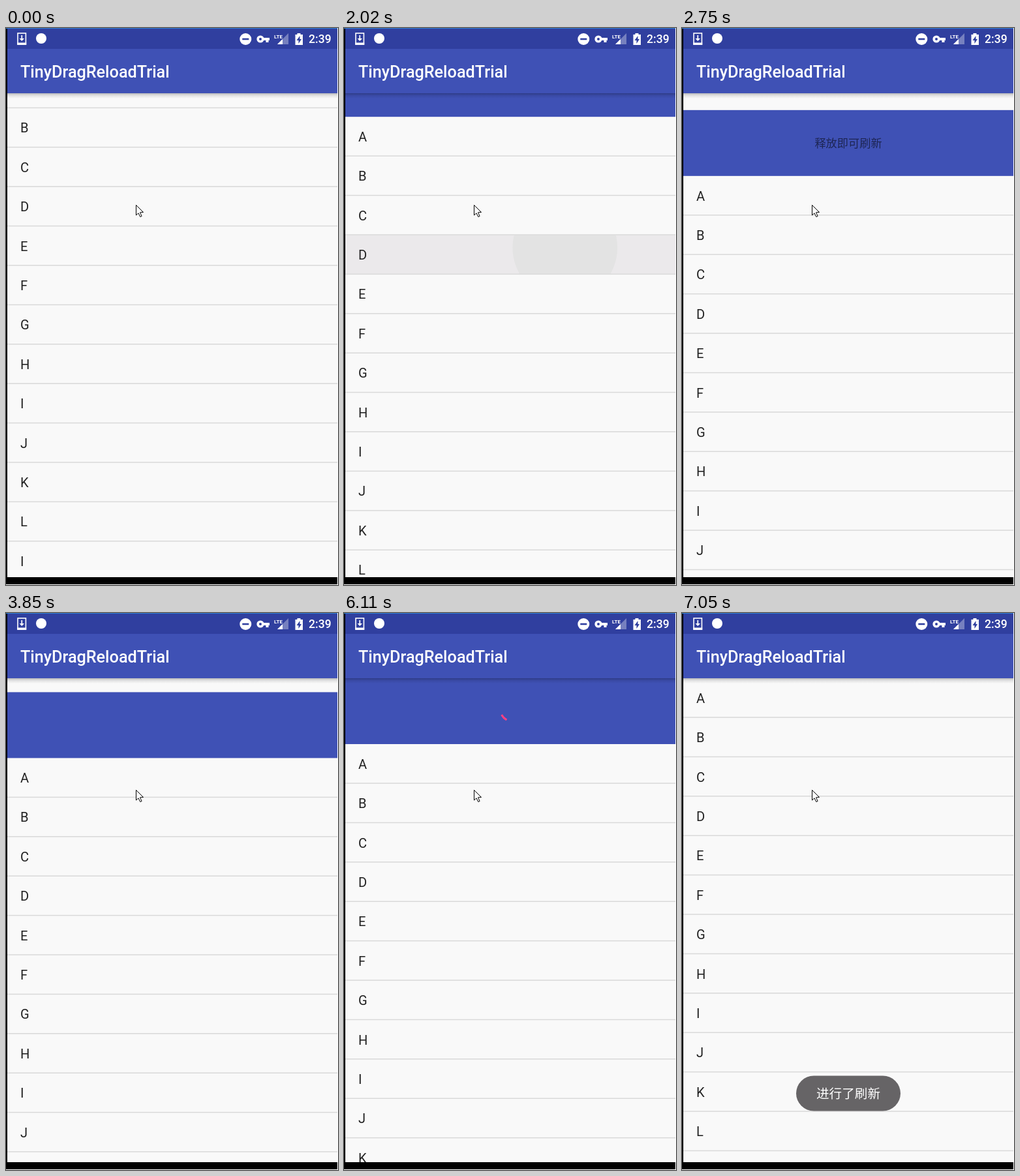
An HTML page with a canvas for the animation above (8 s loop, 509 by 854 pixels).

```html
<!DOCTYPE html>
<html lang="en">
<head>
<meta charset="utf-8">
<title>Pull to refresh</title>
<style>
  html, body { margin: 0; width: 100%; height: 100%; overflow: hidden; background: #fff; }
  canvas { display: block; }
</style>
</head>
<body>
<canvas id="stage" width="509" height="854"></canvas>
<script>
const ctx = document.getElementById('stage').getContext('2d');
const LOOP = 8000, LEFT = 2, RIGHT = 508, TOP = 100, BOTTOM = 842;
const ROW = 60.4, HEADER = 101, MID = 255;
const LETTERS = 'ABCDEFGHIJKLI';
const PRIMARY = '#3f51b5', DARK = '#303f9f', PAPER = '#f9f9f9';
const LATIN = 'Roboto, sans-serif';
const CJK = '"Noto Sans CJK SC", "Noto Sans CJK", "Noto Sans CJK JP", sans-serif';

// Finger-driven list offset: [time, offset]
const DRAG = [[0, -37.7], [739, -37.7], [740, -27], [870, 0], [1790, 0], [1900, 12], [2020, 36],
  [2240, 73], [2450, 103.5], [2600, 118], [2810, 130.3], [2970, 130.3], [3070, 131.3], [3849, 131.3]];

const clamp = v => Math.max(0, Math.min(1, v));
const ramp = (t, a, b) => clamp((t - a) / (b - a));
const smooth = p => (1 - Math.cos(Math.PI * p)) / 2;

function along(keys, t) {
  const i = keys.findIndex(k => k[0] > t);
  const [t0, v0] = keys[i - 1], [t1, v1] = keys[i];
  return v0 + (v1 - v0) * (t - t0) / (t1 - t0);
}

function listOffset(t) {
  if (t < 3849) return along(DRAG, t);
  if (t < 6380) return 131.3 + (HEADER - 131.3) * smooth(ramp(t, 3705, 4105));
  return HEADER * (1 - smooth(ramp(t, 6350, 6780)));
}

function rect(x, y, w, h, color) {
  ctx.fillStyle = color;
  ctx.fillRect(x, y, w, h);
}

function disc(x, y, r, color) {
  ctx.fillStyle = color;
  ctx.beginPath();
  ctx.arc(x, y, r, 0, 2 * Math.PI);
  ctx.fill();
}

function poly(color, ...pts) {
  ctx.fillStyle = color;
  ctx.beginPath();
  for (let i = 0; i < pts.length; i += 2) ctx.lineTo(pts[i], pts[i + 1]);
  ctx.closePath();
  ctx.fill();
}

function text(str, x, y, font, color, align = 'left') {
  ctx.font = font;
  ctx.fillStyle = color;
  ctx.textAlign = align;
  ctx.fillText(str, x, y);
}

// Solves a cubic timing curve given as x and y control values
function curve(x, xs, ys) {
  const at = ([a, b, c, d], s) => {
    const q = 1 - s;
    return a * q * q * q + 3 * b * q * q * s + 3 * c * q * s * s + d * s * s * s;
  };
  let lo = 0, hi = 1;
  for (let i = 0; i < 24; i++) {
    const s = (lo + hi) / 2;
    if (at(xs, s) < x) lo = s; else hi = s;
  }
  return at(ys, lo);
}

function spinner(t, y) {
  const age = t - 3710, phase = age / 1333 % 1;
  const tail = phase < .5 ? 0 : .75 * curve(phase, [.5, .7, .6, 1], [0, 0, 1, 1]);
  const head = phase > .5 ? .75 : .75 * curve(phase, [0, .2, .1, .5], [0, 0, 1, 1]);
  const turn = phase / 4 + age * 2 / 6665 - .25;
  ctx.strokeStyle = '#ff4081';
  ctx.lineWidth = 3;
  ctx.lineCap = 'square';
  ctx.beginPath();
  ctx.arc(MID, y, 14.3, (tail + turn) * 2 * Math.PI, (Math.max(head, tail + .005) + turn) * 2 * Math.PI);
  ctx.stroke();
}

function ripple(t, off) {
  const glow = ramp(t, 1880, 1980) * (1 - ramp(t, 2060, 2300));
  if (!glow) return;
  const y = TOP + 3 * ROW + off + .5, grow = ramp(t, 1880, 2300);
  ctx.save();
  ctx.beginPath();
  ctx.rect(LEFT, y, RIGHT - LEFT, ROW - 1);
  ctx.clip();
  ctx.globalAlpha = glow;
  rect(LEFT, y, RIGHT - LEFT, ROW, '#ebe9eb');
  disc(367 - 84 * grow, y + 19, 30 + 150 * grow, '#e3e3e3');
  ctx.restore();
}

function list(t, off) {
  ripple(t, off);
  [...LETTERS].forEach((letter, i) => {
    const y = TOP + i * ROW + off;
    rect(LEFT, y + ROW - 1.1, RIGHT - LEFT, 1.5, '#d9d9d9');
    text(letter, 22, y + 37.7, '20.1px ' + LATIN, '#212121');
  });
}

function header(t, off) {
  if (off <= 0) return;
  rect(LEFT, TOP + off - HEADER, RIGHT - LEFT, HEADER, PRIMARY);
  const mid = TOP + off - HEADER / 2;
  if (t < 3849) {
    const hint = off < HEADER ? '下拉即可刷新' : '释放即可刷新';
    text(hint, MID, mid + 6.7, '17.2px ' + CJK, 'rgba(0,0,0,.54)', 'center');
  } else if (t >= 3900 && t < 6380) {
    spinner(t, mid);
  }
}

function scrollbar(t, off) {
  if (t < 740 || t >= 1370) return;
  const alpha = .21 * (1 - ramp(t, 1260, 1370));
  rect(503, TOP - off * .77, 5, 570, `rgba(0,0,0,${alpha})`);
}

function statusBar() {
  rect(LEFT, 0, RIGHT - LEFT, 32, DARK);
  rect(0, 0, RIGHT, 1, '#2f7fd0');

  // Download
  ctx.strokeStyle = '#fff';
  ctx.lineWidth = 1.6;
  ctx.strokeRect(18, 8, 12.4, 17);
  rect(17.2, 22.5, 14, 3.3, '#fff');
  rect(23.4, 11, 1.7, 6, '#fff');
  poly('#fff', 20.5, 16, 28, 16, 24.2, 20);

  disc(54, 16, 8, '#fff');

  // Do not disturb
  disc(367.3, 17, 9, '#fff');
  rect(362.3, 15.7, 10, 2.6, DARK);

  // Key
  disc(390, 17, 5.6, '#fff');
  rect(393, 15, 11, 4, '#fff');
  rect(398.5, 17, 4, 5, '#fff');
  disc(390, 17, 2, DARK);

  // Signal
  poly('#7680bf', 433, 8, 433, 25, 416, 25);
  poly('#fff', 424, 17, 424, 25, 416, 25);
  rect(410, 6, 14, 11, DARK);
  text('LTE', 411, 15.5, '700 8px ' + LATIN, '#fff');

  // Battery
  rect(446.5, 8, 5, 3, '#fff');
  rect(443.5, 10, 11.5, 16, '#fff');
  poly(DARK, 450.5, 12, 445.5, 19, 448.5, 19, 448.5, 24, 453, 17, 450.5, 17);

  text('2:39', 464, 23.3, '500 17.6px ' + LATIN, '#fff');
}

function appBar() {
  const shade = ctx.createLinearGradient(0, TOP, 0, TOP + 8);
  shade.addColorStop(0, 'rgba(0,0,0,.26)');
  shade.addColorStop(.4, 'rgba(0,0,0,.1)');
  shade.addColorStop(1, 'rgba(0,0,0,0)');
  rect(LEFT, TOP, RIGHT - LEFT, 8, shade);
  rect(LEFT, 31, RIGHT - LEFT, TOP - 31, PRIMARY);
  text('TinyDragReloadTrial', 22, 76, '500 25.2px ' + LATIN, '#fff');
}

function toast(t) {
  ctx.globalAlpha = 1 - (1 - ramp(t, 6500, 7040)) ** 2;
  ctx.fillStyle = '#666466';
  ctx.beginPath();
  ctx.roundRect(175, 709.5, 160, 54, 27);
  ctx.fill();
  text('进行了刷新', MID, 744.2, '300 19.6px ' + CJK, '#fff', 'center');
  ctx.globalAlpha = 1;
}

function pointer() {
  ctx.save();
  ctx.translate(199.5, 271.5);
  ctx.lineJoin = 'miter';
  ctx.lineWidth = 1;
  ctx.strokeStyle = '#000';
  poly('#fff', 0, 0, 0, 15.5, 3.5, 12.3, 6.3, 18, 8.6, 17, 6, 11.3, 11, 11);
  ctx.stroke();
  ctx.restore();
}

function draw(t) {
  const off = listOffset(t);
  rect(0, 0, 509, 854, '#fff');
  ctx.save();
  ctx.beginPath();
  ctx.rect(LEFT, TOP, RIGHT - LEFT, BOTTOM - TOP);
  ctx.clip();
  rect(LEFT, TOP, RIGHT - LEFT, BOTTOM - TOP, PAPER);
  list(t, off);
  header(t, off);
  scrollbar(t, off);
  ctx.restore();
  appBar();
  statusBar();
  rect(0, 1, LEFT, 852, '#000');
  rect(0, BOTTOM, RIGHT, 11, '#000');
  if (t >= 6500) toast(t);
  pointer();
}

const start = performance.now();
function tick() {
  draw((performance.now() - start) % LOOP);
  requestAnimationFrame(tick);
}
tick();
</script>
</body>
</html>
```
